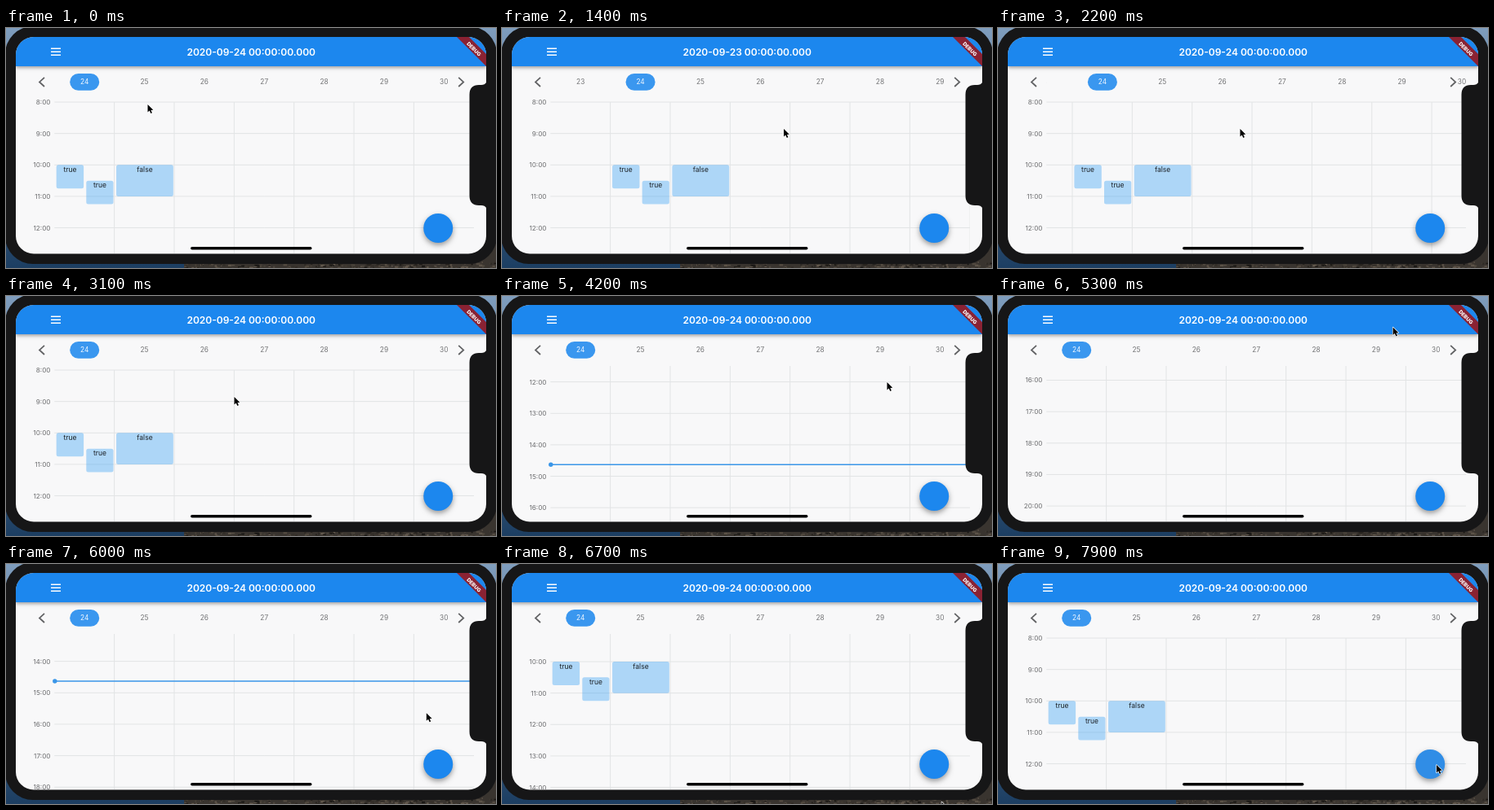
Write an HTML page with a canvas that moves like this. It is 600 px wide and 295 px high and loops after 8 s.

```html
<!DOCTYPE html>
<html lang="en">
<head>
<meta charset="utf-8">
<title>Timetable</title>
<style>
html, body { margin: 0; width: 100%; height: 100%; overflow: hidden; background: #161617; }
canvas { display: block; width: 600px; height: 295px; }
</style>
</head>
<body>
<canvas id="stage"></canvas>
<script>
const W = 600, H = 295, LOOP = 8000, STEP = 100;
const LEFT = 59.3, COL = 73.35, TOP = 91, HOUR = 38.65, FIRST = 8;
const BLUE = '#1c87ee', FONT = 'Inter, Roboto, sans-serif';

const canvas = document.getElementById('stage');
const dpr = window.devicePixelRatio || 1;
canvas.width = W * dpr;
canvas.height = H * dpr;
const c = canvas.getContext('2d');
c.scale(dpr, dpr);

// Keyframes: [time, value...]
const PAGE = [[400, 0], [1200, 1], [1600, 1], [2700, 0]];
const SCROLL = [[3600, 0], [4200, 140], [4500, 170], [5200, 296.7], [5500, 296.7], [6700, 48.3], [7300, 0]];
const POINTER = [
  [0, 173.5, 94], [500, 272, 124], [1200, 345, 124], [1600, 345, 124], [2500, 279.5, 124],
  [3100, 279.5, 124], [3600, 472, 212], [4200, 471.5, 106], [4700, 471, -20],
  [6900, 540, 300], [7300, 540, 300], [7800, 537, 247]
];

const EVENTS = [
  { label: 'true', x: 2.4, w: 33.4, from: 10, to: 10.75 },
  { label: 'true', x: 39, w: 33.2, from: 10.5, to: 11.25 },
  { label: 'false', x: COL + 2.4, w: 69.8, from: 10, to: 11 }
];

function at(keys, t) {
  const n = keys.findIndex(k => k[0] > t);
  if (n === 0) return keys[0].slice(1);
  if (n < 0) return keys[keys.length - 1].slice(1);
  const a = keys[n - 1], b = keys[n];
  const u = (t - a[0]) / (b[0] - a[0]);
  const e = u * u * (3 - 2 * u);
  return a.slice(1).map((v, i) => v + (b[i + 1] - v) * e);
}

function box(x, y, w, h, r, fill) {
  c.beginPath();
  c.roundRect(x, y, w, h, r);
  c.fillStyle = fill;
  c.fill();
}

function line(points, color, width) {
  c.beginPath();
  points.forEach(([x, y]) => c.lineTo(x, y));
  c.strokeStyle = color;
  c.lineWidth = width;
  c.stroke();
}

function disc(x, y, r, fill) {
  c.beginPath();
  c.arc(x, y, r, 0, 7);
  c.fillStyle = fill;
  c.fill();
}

function text(s, x, y, size, color, align = 'center', weight = 400) {
  c.font = `${weight} ${size}px ${FONT}`;
  c.textAlign = align;
  c.textBaseline = 'alphabetic';
  c.fillStyle = color;
  c.fillText(s, x, y + size * 0.36);
}

function clipped(x, y, w, h, r, draw) {
  c.save();
  c.beginPath();
  c.roundRect(x, y, w, h, r);
  c.clip();
  draw();
  c.restore();
}

function shadow(color, blur, dy) {
  c.shadowColor = color;
  c.shadowBlur = blur * dpr;
  c.shadowOffsetY = dy * dpr;
}

function desktop() {
  const sea = c.createLinearGradient(0, 0, 0, H);
  sea.addColorStop(0, '#7f9dbd');
  sea.addColorStop(1, '#1c3e62');
  c.fillStyle = sea;
  c.fillRect(0, 0, W, H);
  c.fillStyle = '#39342f';
  c.fillRect(218, 262, W - 218, 33);
  let seed = 7;
  const rnd = () => (seed = seed * 16807 % 2147483647) / 2147483647;
  for (let i = 0; i < 260; i++) {
    const v = 25 + rnd() * 75;
    c.fillStyle = `rgb(${v}, ${v * 0.9}, ${v * 0.78})`;
    c.fillRect(218 + rnd() * 382, 287 + rnd() * 8, 1 + rnd() * 4, 1 + rnd() * 1.5);
  }
  box(-1, -2, 602, 292, 34, '#161617');
}

function grid(page, scroll) {
  const shift = LEFT + page * COL;
  const yOf = h => TOP + (h - FIRST) * HOUR - scroll;
  const head = Math.max(86, TOP - scroll);

  clipped(12, 86, 576, 191, 0, () => {
    for (let h = FIRST; h < 24; h++) {
      const y = yOf(h);
      line([[LEFT, y], [573, y]], '#e2e4e5', 1);
      text(h + ':00', 54.5, y, 8.2, '#6c6d6f', 'right');
    }
  });
  clipped(LEFT + 0.7, 86, 512.5, 191, 0, () => {
    for (let i = -1; i < 7; i++) {
      const x = shift + i * COL;
      if (x > LEFT + 1) line([[x, head], [x, 277]], '#e2e4e5', 1);
    }
    for (const e of EVENTS) {
      const x = shift + e.x, y = yOf(e.from);
      box(x, y, e.w, yOf(e.to) - y, 2.5, 'rgba(33,150,243,.35)');
      text(e.label, x + e.w / 2, y + 5.6, 8.5, '#1d2227');
    }
  });
  clipped(LEFT - 4, 86, 517, 191, 0, () => {
    const y = yOf(14.63);
    line([[shift, y], [573, y]], '#3a96e8', 1.4);
    disc(shift + 0.5, y, 2.7, '#3a96e8');
  });
}

function dates(page) {
  clipped(LEFT, 48, 514, 38, 0, () => {
    for (let d = 22; d < 32; d++) {
      const x = 96.2 + (d - 24 + page) * COL;
      const today = d === 24;
      if (today) box(x - 18, 56, 36, 20.8, 10.4, '#3a97ef');
      text(d > 30 ? '1' : String(d), x, 66.3, 8.3, today ? '#f2f8ff' : '#737476');
    }
  });
  line([[47, 60.8], [41, 66.4], [47, 72]], '#626365', 1.8);
  line([[554.2, 60.8], [560.2, 66.4], [554.2, 72]], '#626365', 1.8);
}

function appBar(page) {
  c.save();
  shadow('rgba(0,0,0,.35)', 4, 1.5);
  box(12, 11, 576, 36, 0, BLUE);
  c.restore();
  for (const y of [25.2, 29.2, 33.2]) line([[55, y], [67, y]], '#fff', 1.4);
  const day = 24 - Math.round(page);
  text(`2020-09-${day} 00:00:00.000`, 300.2, 29.2, 12, '#fff', 'center', 600);

  c.beginPath();
  [[552, 11], [567, 11], [588, 32], [588, 47]].forEach(p => c.lineTo(...p));
  c.fillStyle = '#8a2233';
  c.fill();
  c.save();
  c.translate(573, 25.8);
  c.rotate(Math.PI / 4);
  text('DEBUG', 0, 0, 6.3, '#fff', 'center', 800);
  c.restore();
}

function notch() {
  c.beginPath();
  c.moveTo(589, 64);
  c.quadraticCurveTo(588, 70, 582, 70);
  c.lineTo(579, 70);
  c.quadraticCurveTo(567.5, 70, 567.5, 82);
  c.lineTo(567.5, 206);
  c.quadraticCurveTo(567.5, 218, 579, 218);
  c.lineTo(582, 218);
  c.quadraticCurveTo(588, 218, 589, 224);
  c.fillStyle = '#161617';
  c.fill();
}

function pointer(x, y) {
  const shape = [[0, 0], [0, 9.6], [2.2, 7.6], [3.8, 11], [5.4, 10.3], [3.9, 7], [6.8, 6.8]];
  c.save();
  c.translate(x, y);
  c.lineJoin = 'round';
  c.beginPath();
  shape.forEach(p => c.lineTo(...p));
  c.closePath();
  c.strokeStyle = '#fff';
  c.lineWidth = 1.3;
  c.stroke();
  c.fillStyle = '#000';
  c.fill();
  c.restore();
}

function draw(t) {
  const [page] = at(PAGE, t), [scroll] = at(SCROLL, t), [px, py] = at(POINTER, t);
  desktop();
  clipped(12, 11, 576, 266.5, 22, () => {
    c.fillStyle = '#f8f8f9';
    c.fillRect(12, 11, 576, 267);
    grid(page, scroll);
    dates(page);
    appBar(page);
    c.save();
    shadow('rgba(0,0,0,.38)', 6, 3);
    const hover = Math.hypot(px - 529, py - 246) < 18;
    disc(529.2, 246, 18, hover ? '#308de6' : BLUE);
    c.restore();
    box(226, 269, 148.5, 3.6, 1.8, '#000');
    notch();
  });
  pointer(px, py);
}

function frame(now) {
  draw(Math.floor((now % LOOP) / STEP) * STEP);
  requestAnimationFrame(frame);
}
requestAnimationFrame(frame);
</script>
</body>
</html>
```
